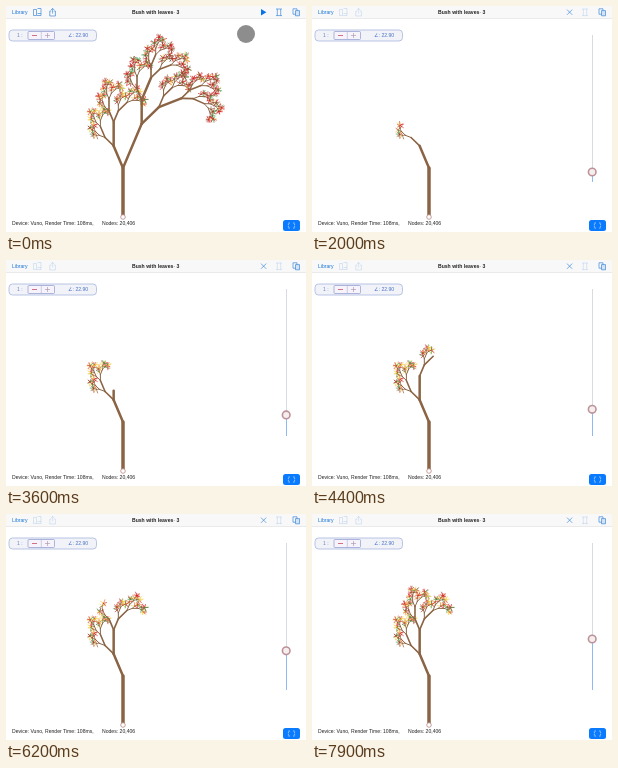
Animation of 300x226 px, one loop 8000 ms. Source, as an HTML page with a canvas:

```html
<!DOCTYPE html>
<html lang="en">
<head>
<meta charset="utf-8">
<title>Bush with leaves</title>
<style>
  html, body { margin: 0; width: 100%; height: 100%; overflow: hidden; background: #fff; }
  #stage { position: relative; width: 300px; height: 226px; overflow: hidden; }
  canvas, svg { position: absolute; left: 0; top: 0; width: 300px; height: 226px; }
  text { font-family: "Liberation Sans", Arial, sans-serif; font-size: 5.1px; fill: #222; white-space: pre; }
  .blue { fill: #1673d6; }
  .icon { fill: none; stroke: #3f88d8; stroke-width: .7; }
</style>
</head>
<body>
<div id="stage">
  <canvas id="tree"></canvas>
  <svg viewBox="0 0 300 226">
    <rect width="300" height="12.5" fill="#f8f8f8"/>
    <path d="M0 12.5H300" stroke="#d8d8da" stroke-width=".5"/>
    <text class="blue" x="6" y="8.3">Library</text>
    <g class="icon dim"><path d="M27.5 3.5h3v6h-3zM31.5 2.5h3.5v5h-3.5M31 9.5h4v-2"/></g>
    <g class="icon dim"><path d="M45.3 5h-1.5v5h5.6v-5h-1.5M46.6 7.5v-5M45 4l1.6-1.6L48.2 4"/></g>
    <text x="126" y="8.3" font-weight="bold">Bush with leaves</text>
    <text x="167.6" y="8.3" font-weight="bold" opacity=".35">-</text>
    <text x="170.6" y="8.3" font-weight="bold">3</text>
    <path id="play" d="M255 3l5.4 3.2L255 9.4z" fill="#0a72e8"/>
    <path id="close" class="icon" d="M255 3.6l5.2 5.2M260.2 3.6L255 8.8"/>
    <g class="icon dim"><path d="M270 3h6M270 9.6h6M271.3 3v6.6M274.7 3v6.6"/></g>
    <g class="icon" id="panes"><path d="M287 2.8h4v5.4h-4z"/><path d="M289.5 4.6h4v5.2h-4z" fill="#d3e4f7"/></g>

    <rect x="3" y="24" width="87.5" height="11" rx="3.5" fill="#f1f3f8" stroke="#a9b7df" stroke-width=".8"/>
    <text x="11" y="31.3" style="fill:#6d83bd">1 :</text>
    <rect x="22" y="25.5" width="26.5" height="8" rx="1" fill="#f6f4fa" stroke="#8f9ad0" stroke-width=".7"/>
    <path d="M35.3 25.5v8" stroke="#a9b2d8" stroke-width=".6"/>
    <path d="M26 29.5h5" stroke="#d0607a" stroke-width=".9"/>
    <path d="M39 29.5h5M41.5 27v5" stroke="#a58fae" stroke-width=".6"/>
    <text x="62" y="31.3" style="fill:#4a72c4">∠: 22.90</text>

    <text x="6" y="218.8">Device: Vuno,</text>
    <text x="39" y="218.8">Render Time: 108ms,</text>
    <text x="96" y="218.8">Nodes: 20,406</text>
    <circle cx="117" cy="211" r="2.3" fill="#fff" stroke="#b98c88" stroke-width=".8"/>

    <rect x="277" y="214" width="17" height="11" rx="2.5" fill="#0a7aff"/>
    <path d="M284 217h-1.6v5h1.6M287 217h1.6v5h-1.6" fill="none" stroke="#c4e0ff" stroke-width=".7" stroke-dasharray="1.6 .6"/>

    <g id="slider">
      <path d="M280.5 29V176" stroke="#d8dbe0" stroke-width="1"/>
      <path id="fill" stroke="#8fbaf0" stroke-width="1"/>
      <circle id="thumb" cx="280.2" r="3.8" fill="#f5eeee" stroke="#bd929a" stroke-width="1.6"/>
    </g>
    <circle id="touch" r="9" fill="#8d8d8d"/>
  </svg>
</div>
<script>
const LOOP = 8000, STEP = 100;
const TURN = 22.9 * Math.PI / 180, DEPTH = 5, TRUNK = 48;
const WIDTHS = [3.5, 2.5, 1.6, 1, 0.7];
const RAYS = 4, LEAF_COST = 8;
const RED = '#cf2020', GREEN = '#35983a', YELLOW = '#f2cf45', ORANGE = '#e0702c', BROWN = '#86552f';

const $ = id => document.getElementById(id);
const clamp = x => Math.max(0, Math.min(1, x));
const ease = x => x * x * (3 - 2 * x);
const mix = (a, b, k) => a + (b - a) * k;

let seed = 41;
const rnd = () => (seed = seed * 16807 % 2147483647) / 2147483647;

// X -> F[-X]+F[+X]-X, with F halving at every level
const ops = [];
let leaves = 0;

function stem(p, dir, level) {
  const len = TRUNK / 2 ** level;
  const end = { x: p.x + len * Math.sin(dir), y: p.y - len * Math.cos(dir) };
  const width = level ? WIDTHS[level] : mix(WIDTHS[0], WIDTHS[1], Math.abs(dir) > 0 ? 1 : 0);
  ops.push({ cost: 2 ** (DEPTH - 1 - level), from: p, to: end, width });
  return end;
}

function leaf(p, dir) {
  const warm = leaves++ < 81 ? 0.36 : 0.1;
  const color = () => {
    const r = rnd();
    if (r < warm) return rnd() < 0.75 ? YELLOW : ORANGE;
    const s = rnd();
    return s < 0.6 ? RED : s < 0.85 ? GREEN : BROWN;
  };
  const main = color();
  const rays = Array.from({ length: RAYS }, (_, i) => ({
    dir: dir + (i - 1.5) * 1.1 + (rnd() - 0.5) * 0.4,
    len: 2.4 + rnd() * 1.6,
    color: rnd() < 0.45 ? main : color()
  }));
  ops.push({ cost: LEAF_COST, from: p, rays });
}

function grow(p, dir, level) {
  if (level === DEPTH) return leaf(p, dir);
  const a = stem(p, dir, level);
  grow(a, dir - TURN, level + 1);
  const b = stem(a, dir + TURN, level);
  grow(b, dir + 2 * TURN, level + 1);
  grow(b, dir, level + 1);
}

grow({ x: 117, y: 210 }, 0, 0);
const total = ops.reduce((sum, op) => sum + op.cost, 0);

const canvas = $('tree'), ctx = canvas.getContext('2d');
const dpr = Math.max(1, window.devicePixelRatio || 1);
canvas.width = 300 * dpr;
canvas.height = 226 * dpr;
ctx.scale(dpr, dpr);
ctx.lineCap = 'round';

function line(a, x, y, width, color) {
  ctx.lineWidth = width;
  ctx.strokeStyle = color;
  ctx.beginPath();
  ctx.moveTo(a.x, a.y);
  ctx.lineTo(x, y);
  ctx.stroke();
}

function drawTree(part) {
  ctx.clearRect(0, 0, 300, 226);
  let left = part * total;
  for (const op of ops) {
    if (left <= 0) break;
    const k = clamp(left / op.cost), { from, to } = op;
    if (to) {
      line(from, mix(from.x, to.x, k), mix(from.y, to.y, k), op.width, '#8a6444');
    } else {
      for (const r of op.rays.slice(0, Math.ceil(k * RAYS)))
        line(from, from.x + r.len * Math.sin(r.dir), from.y - r.len * Math.cos(r.dir), 0.65, r.color);
    }
    left -= op.cost;
  }
}

const TOP = 33, LOW = 166;
function thumbY(t) {
  if (t < 2000) return mix(TOP, LOW, ease(clamp((t - 1400) / 500)));
  return LOW - 0.00695 * (t - 2000);
}

function render(t) {
  const open = t >= 1200;
  const y = thumbY(t);
  drawTree(1 - (y - TOP) / (LOW - TOP) * 0.9616);

  $('thumb').setAttribute('cy', y);
  $('fill').setAttribute('d', `M280.5 ${y}V176`);
  $('slider').style.display = $('close').style.display = open ? '' : 'none';
  $('play').style.display = open ? 'none' : '';

  const dim = mix(1, 0.25, clamp((t - 1100) / 200));
  for (const el of document.querySelectorAll('.dim')) el.style.opacity = dim;
  $('panes').style.opacity = t >= 1200 && t < 1500 ? 0.5 : 1;

  const k = ease(clamp(t / 900));
  const touch = $('touch');
  touch.setAttribute('cx', mix(240, 257, k));
  touch.setAttribute('cy', mix(28, 12, k));
  touch.style.opacity = 1 - clamp((t - 1000) / 200);
}

const start = performance.now();
let last = -1;
function tick() {
  const t = Math.floor((performance.now() - start) % LOOP / STEP) * STEP;
  if (t !== last) render(last = t);
  requestAnimationFrame(tick);
}
tick();
</script>
</body>
</html>
```
